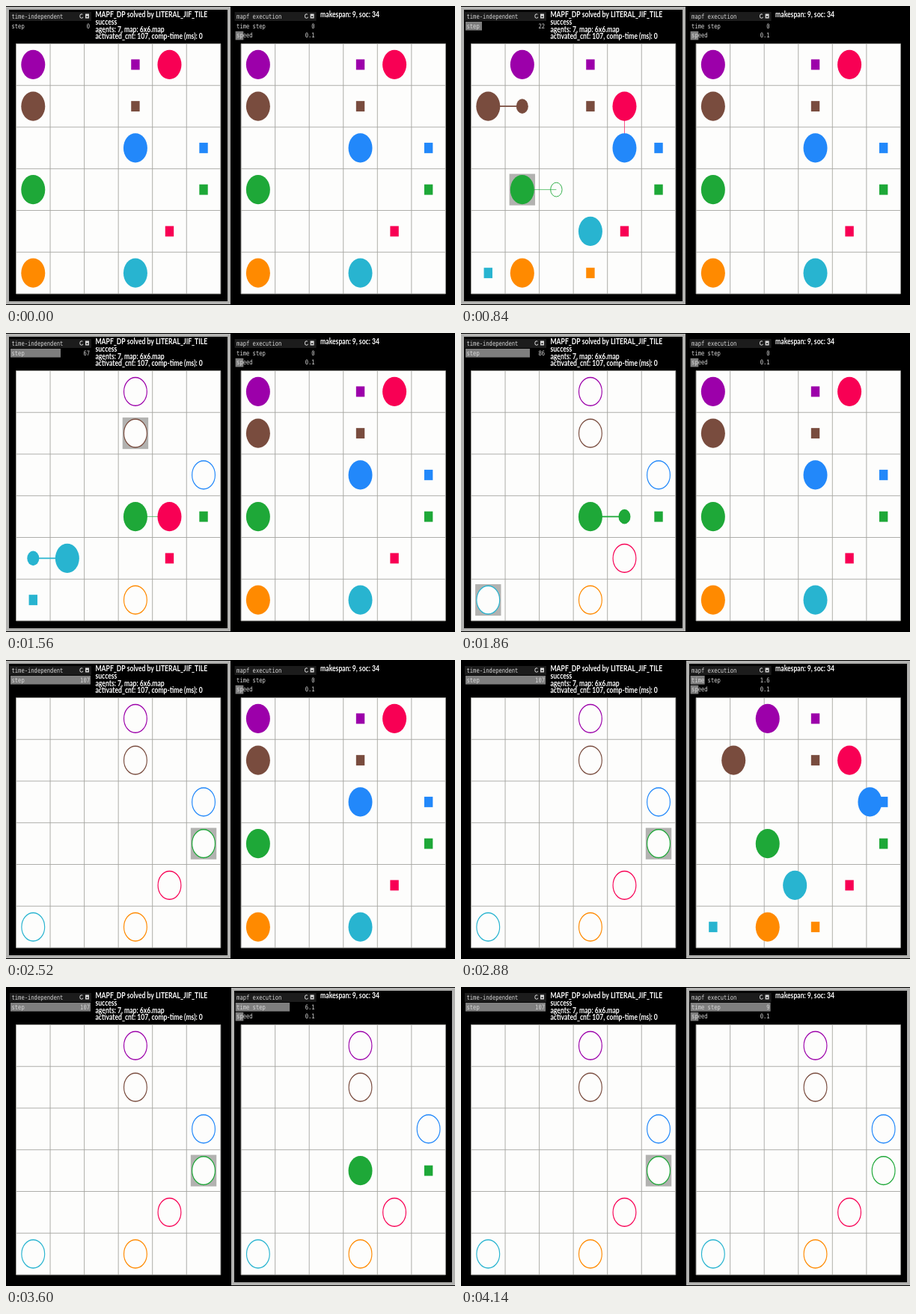
Write an HTML page with a canvas that moves like this. It is 600 by 400 pixels and loops after 4260 ms.

```html
<!DOCTYPE html>
<html lang="en">
<head>
<meta charset="utf-8">
<title>Grid agents</title>
<style>
  html, body { margin: 0; width: 100%; height: 100%; overflow: hidden; background: #000; }
  canvas { display: block; }
</style>
</head>
<body>
<canvas id="stage" width="600" height="400"></canvas>
<script>
const ctx = document.getElementById("stage").getContext("2d");
const LOOP = 4260, TICK = 60, LAST = 4140, SWITCH = 2580;
const CELL = 45.55, TALL = 1.224;          // the scene is taller than wide
const LEFT = 13.5, TOP = 50.5 / TALL, SHIFT = 300.6;
const STEPS = 107, SPAN = 9;
const GREY = "#b2b2b0", PAPER = "#fdfdfc", RULE = "#a4a4a0";
const BAR = "#7e7e7e", HEAD = "#1c1c1c", INK = "#d8d8d8";
const DIR = { R: [1, 0], L: [-1, 0], U: [0, -1], D: [0, 1], ".": [0, 0] };

// start cell, one move per time step, and for each real move the
// activation steps at which it is requested, begun and finished
const agents = [
  { color: "#9c00aa", start: [0, 0], moves: "RRR",
    events: [3, 8, 15, 27, 33, 39, 46, 53, 58] },
  { color: "#794c3e", start: [0, 1], moves: ".RRR",
    events: [5, 18, 26, 31, 42, 50, 56, 61, 67] },
  { color: "#2288fa", start: [3, 2], moves: "RR",
    events: [2, 6, 12, 24, 29, 36] },
  { color: "#1ea838", start: [0, 3], moves: "RRR....RR",
    events: [4, 11, 16, 22, 30, 37, 41, 43, 49, 62, 84, 92, 97, 102, 107] },
  { color: "#f80054", start: [4, 0], moves: "D.DD.D",
    events: [1, 9, 17, 21, 38, 51, 55, 59, 64, 69, 73, 78] },
  { color: "#ff8a00", start: [0, 5], moves: "RR.R",
    events: [10, 14, 20, 28, 32, 35, 44, 47, 52] },
  { color: "#28b4d0", start: [3, 5], moves: "ULLL.D",
    events: [7, 13, 19, 25, 34, 40, 45, 48, 54, 60, 65, 70, 74, 80, 86] }
];

function walk(start, moves) {
  const cells = [start];
  for (const m of moves) {
    const [x, y] = cells[cells.length - 1];
    cells.push([x + DIR[m][0], y + DIR[m][1]]);
  }
  return cells;
}

for (const a of agents) {
  a.timed = walk(a.start, a.moves);
  a.path = walk(a.start, a.moves.replaceAll(".", ""));
  a.goal = a.path[a.path.length - 1];
}

const clamp = (v, max) => Math.max(0, Math.min(max, v));
const px = ([x, y]) => [LEFT + (x + 0.5) * CELL, TOP + (y + 0.5) * CELL];

function rect(color, x, y, w, h) {
  ctx.fillStyle = color;
  ctx.fillRect(x, y / TALL, w, h / TALL);
}

function square(color, cell, size) {
  const [x, y] = px(cell);
  ctx.fillStyle = color;
  ctx.fillRect(x - size / 2, y - size / 2, size, size);
}

function disc(cell, r, fill, stroke, width) {
  ctx.beginPath();
  ctx.arc(...px(cell), r, 0, 7);
  if (fill) { ctx.fillStyle = fill; ctx.fill(); }
  if (stroke) { ctx.strokeStyle = stroke; ctx.lineWidth = width; ctx.stroke(); }
}

function line(color, width, x1, y1, x2, y2) {
  ctx.strokeStyle = color;
  ctx.lineWidth = width;
  ctx.beginPath();
  ctx.moveTo(x1, y1);
  ctx.lineTo(x2, y2);
  ctx.stroke();
}

function label(text, x, y, align = "left") {
  ctx.font = "7.15px 'DejaVu Sans Mono', monospace";
  ctx.textBaseline = "middle";
  ctx.textAlign = align;
  ctx.fillStyle = INK;
  ctx.fillText(text, x, y / TALL);
}

function note(lines) {
  ctx.font = "bold 8.6px Lato, sans-serif";
  ctx.textBaseline = "alphabetic";
  ctx.textAlign = "left";
  ctx.fillStyle = "#fff";
  lines.forEach((s, i) => ctx.fillText(s, 119.5, (15 + 9.8 * i) / TALL));
}

function slider(row, name, value, max) {
  const y = 21 + row * 12.8;
  rect(BAR, 6, y, 107 * value / max, 11.6);
  label(name, 7.5, y + 6.3);
  label(String(+value.toFixed(1)), 112, y + 6.3, "right");
}

function header(title) {
  rect(HEAD, 5, 8, 109, 12);
  label(title, 7.5, 14.5);
  ctx.strokeStyle = INK;
  ctx.lineWidth = 0.9;
  ctx.beginPath();
  ctx.arc(101, 13.5 / TALL, 2.2, 0.5, 5.4);
  ctx.stroke();
  rect(INK, 106, 10.5, 5, 6);
  rect(HEAD, 107.3, 13.5, 2.4, 1.5);
}

function grid() {
  ctx.fillStyle = PAPER;
  ctx.fillRect(LEFT, TOP, 6 * CELL, 6 * CELL);
  for (let i = 0; i <= 6; i++) {
    const d = i * CELL, end = 6 * CELL;
    line(RULE, 0.8, LEFT + d, TOP, LEFT + d, TOP + end);
    line(RULE, 0.8, LEFT, TOP + d, LEFT + end, TOP + d);
  }
}

function body(a, cell, done) {
  if (done) disc(cell, 15.4, PAPER, a.color, 1.15);
  else disc(cell, 16, a.color);
}

function stepPanel(step) {
  header("time-independent");
  slider(0, "step", step, STEPS);
  note(["MAPF_DP solved by LITERAL_JIF_TILE", "success",
        "agents: 7, map: 6x6.map", "activated_cnt: 107, comp-time (ms): 0"]);
  grid();
  const states = agents.map(a => {
    const passed = a.events.filter(e => e <= step).length;
    const at = Math.floor(passed / 3);
    return { a, cell: a.path[at], next: a.path[at + 1], phase: passed % 3,
             done: passed === a.events.length };
  });
  if (step > 0) {
    const hit = states.find(s => s.a.events.includes(step));
    square(GREY, (hit || states[step * 5 % 7]).cell, 34.4);
  }
  for (const s of states) if (!s.done) square(s.a.color, s.a.goal, 11.4);
  for (const { a, cell, next, phase } of states) {
    if (!phase) continue;
    line(a.color, phase === 2 ? 1.5 : 0.6, ...px(cell), ...px(next));
    if (phase === 2) disc(next, 8, a.color);
    else disc(next, 7.7, null, a.color, 0.8);
  }
  for (const s of states) body(s.a, s.cell, s.done);
}

function timePanel(time) {
  header("mapf execution");
  slider(0, "time step", time, SPAN);
  slider(1, "speed", 0.1, 1);
  note(["makespan: 9, soc: 34"]);
  grid();
  const done = a => time >= a.moves.length;
  for (const a of agents) if (!done(a)) square(a.color, a.goal, 11.4);
  for (const a of agents) {
    const i = Math.floor(time), f = time - i;
    const from = a.timed[i] || a.goal, to = a.timed[i + 1] || a.goal;
    body(a, from.map((v, k) => v + (to[k] - v) * f), done(a));
  }
}

function draw(now) {
  const t = Math.min(LAST, Math.floor(now % LOOP / TICK) * TICK);
  const step = Math.round(clamp((t - 489) * 0.0627, STEPS));
  const time = Math.round(clamp((t - 2622) * 0.00627, SPAN) * 10) / 10;

  ctx.setTransform(1, 0, 0, 1, 0, 0);
  ctx.fillStyle = "#000";
  ctx.fillRect(0, 0, 600, 400);
  ctx.strokeStyle = GREY;
  ctx.lineWidth = 4;
  ctx.strokeRect(t < SWITCH ? 2 : 303, 3, t < SWITCH ? 296 : 295, 394);

  ctx.setTransform(1, 0, 0, TALL, 0, 0);
  stepPanel(step);
  ctx.translate(SHIFT, 0);
  timePanel(time);
}

const begun = performance.now();
function loop() {
  draw(performance.now() - begun);
  requestAnimationFrame(loop);
}
loop();
</script>
</body>
</html>
```
